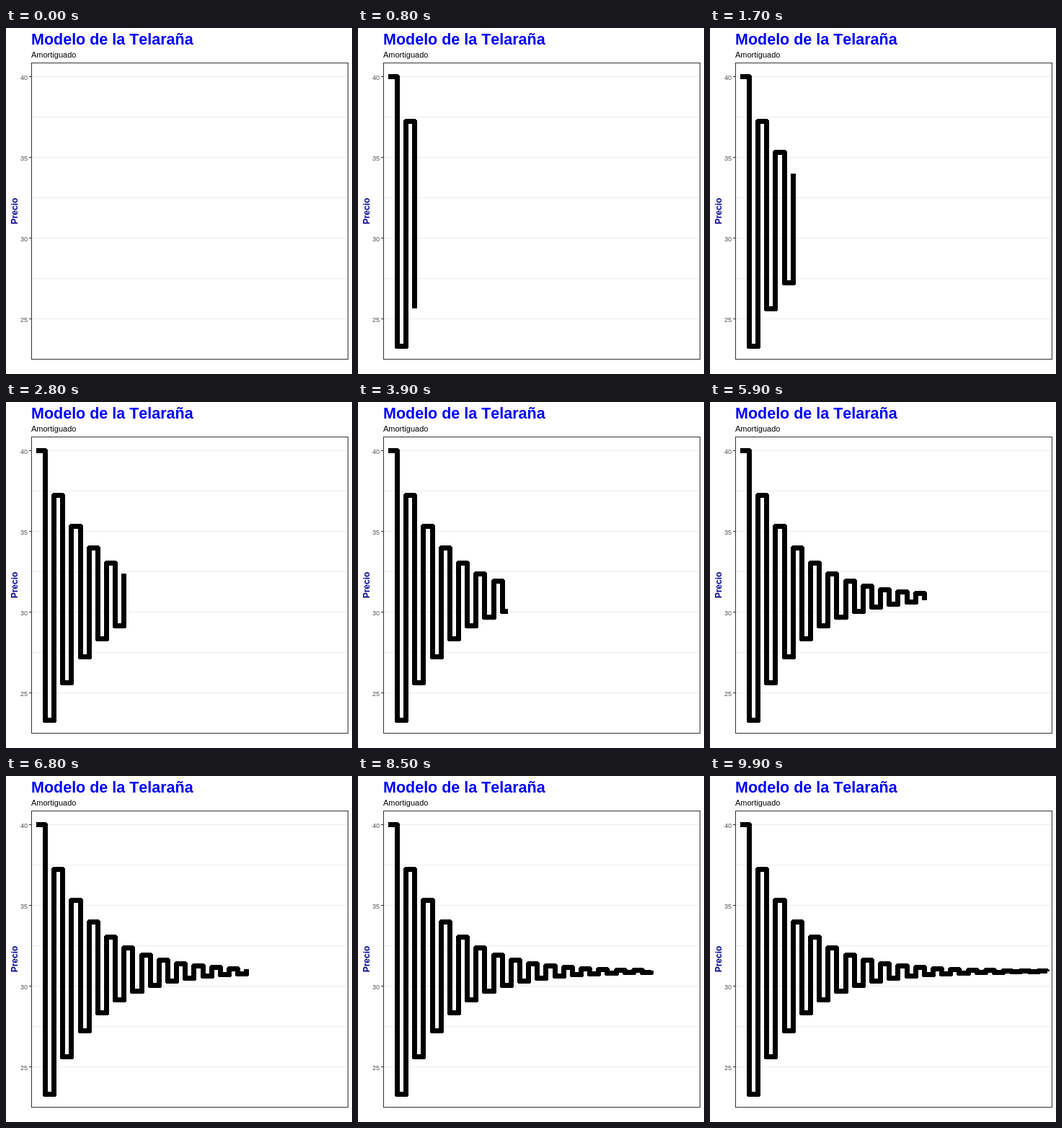
An HTML page for the animation above (10000 ms loop, 480x480 px).

```html
<!DOCTYPE html>
<html lang="es">
<head>
<meta charset="utf-8">
<title>Modelo de la Telaraña</title>
<style>
html, body { margin: 0; width: 100%; height: 100%; overflow: hidden; background: #fff; }
svg { display: block; font-family: "Liberation Sans", Arial, sans-serif; font-kerning: none; }
.axis { font-size: 9px; fill: #4d4d4d; text-anchor: end; }
</style>
</head>
<body>
<svg width="480" height="480" viewBox="0 0 480 480">
  <text x="35" y="23" font-size="21.5" font-weight="bold" fill="#00f">Modelo de la Telaraña</text>
  <text x="35" y="41" font-size="11">Amortiguado</text>
  <text transform="translate(16 254) rotate(-90)" font-size="12" font-weight="bold" fill="#00008b" text-anchor="middle">Precio</text>
  <g id="labels" class="axis"></g>
  <g fill="none" shape-rendering="crispEdges">
    <path id="grid" stroke="#ebebeb"/>
    <path id="web" stroke="#000" stroke-width="7" stroke-linejoin="round"/>
    <path id="ticks" stroke="#333"/>
    <rect x="35.5" y="48.5" width="439" height="411" stroke="#333"/>
  </g>
</svg>
<script>
const el = id => document.getElementById(id);
const FRAMES = 100, FRAME_MS = 100, STEPS = 35;

let grid = '', ticks = '', labels = '';
for (let i = 0; i < 7; i++) {
  const y = 67.5 + 56 * i;
  grid += `M36 ${y}H474`;
  if (i % 2 === 0) {
    ticks += `M32 ${y}H35`;
    labels += `<text x="30" y="${y + 4.5}">${40 - 2.5 * i}</text>`;
  }
}
el('grid').setAttribute('d', grid);
el('ticks').setAttribute('d', ticks);
el('labels').innerHTML = labels;

// The price swings around its equilibrium, shrinking by 5/6 each period.
const px = i => Math.round(41.9 + 12.14 * i);
const py = i => Math.round(270.7 - 203.9 * (-5 / 6) ** i);
const keyFrame = i => Math.round(i * (FRAMES - 1) / STEPS);

function webPath(frame) {
  let i = 0, d = `M${px(0)} ${py(0) + .5}`;
  while (i < STEPS && keyFrame(i + 1) <= frame) {
    i++;
    const tip = keyFrame(i) === frame;
    d += `H${px(i) + .5}V${py(i) + (tip ? 0 : .5)}`;
  }
  const start = keyFrame(i);
  if (frame > start) d += `H${px(i + (frame - start) / (keyFrame(i + 1) - start))}`;
  return d;
}

function draw() {
  const frame = Math.floor(performance.now() / FRAME_MS) % FRAMES;
  el('web').setAttribute('d', webPath(frame));
  requestAnimationFrame(draw);
}
draw();
</script>
</body>
</html>
```
